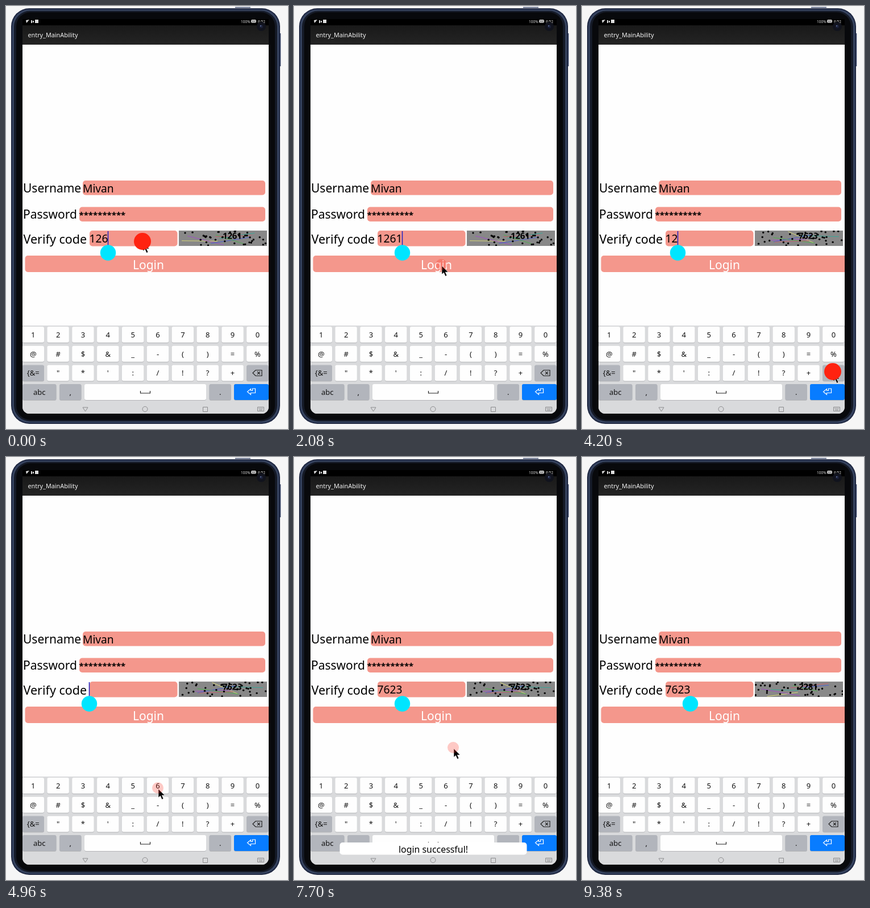
Write an HTML page that moves like this. It is 496x744 px and loops after 9.5 s.

```html
<!DOCTYPE html>
<html lang="en">
<head>
<meta charset="utf-8">
<title>Login form on a tablet</title>
<style>
  html, body { margin: 0; width: 100%; height: 100%; overflow: hidden; background: #f6f6f6; }
  svg { display: block; width: 496px; height: 744px; font-family: "Noto Sans", sans-serif; }
  .label { font-size: 21px; }
  .value { font-size: 19.2px; }
  .field { fill: #f4978c; }
  .icon { fill: none; stroke: #222; stroke-width: 1.2; }
  .nav { fill: none; stroke: #8b8b8d; }
  .key { font-size: 13px; font-weight: 500; text-anchor: middle; fill: #111; }
</style>
</head>
<body>
<svg viewBox="0 0 496 744">
  <defs>
    <clipPath id="screen"><path d="M29 23H462V705a12 12 0 0 1-12 12H41a12 12 0 0 1-12-12z"/></clipPath>
    <clipPath id="captchaBox"><path d="M304 395h155v27H304z"/></clipPath>
    <linearGradient id="bar" x2="0" y2="1"><stop stop-color="#191919"/><stop offset="1" stop-color="#242424"/></linearGradient>
  </defs>

  <path d="M403 2.5h27M482.500 48v58" stroke="#3d4a6c" stroke-width="1.500"/>
  <rect x="9" y="4" width="473" height="731" rx="32" fill="#1d2640"/>
  <rect x="11" y="6" width="469" height="727" rx="30" fill="#36435f"/>
  <rect x="14" y="8.500" width="463" height="722" rx="28" fill="#151a27"/>
  <rect x="18" y="11" width="455" height="717" rx="25" fill="#08090c"/>

  <g clip-path="url(#screen)">
    <path d="M29 23h433v694H29z" fill="#fefefe"/>
    <path d="M29 23h433v11H29z"/>
    <path d="M29 34h433v34H29z" fill="url(#bar)"/>
    <g fill="#ddd" font-size="6.500">
      <path d="M35 25l6-1-5 6zM44 25h2v5h-2zM47 26h2v3h-2zM51 24h6v6h-6z"/>
      <text x="413" y="29.500">100%</text>
      <rect x="431.500" y="24.500" width="8" height="4.500" rx="1" fill="#999" stroke="#ddd"/>
      <text x="443" y="29.500">6:52</text>
    </g>
    <text x="38.500" y="55" font-size="10.800" fill="#f2f2f2">entry_MainAbility</text>

    <g class="field">
      <rect x="135" y="307" width="321" height="25.500" rx="5"/>
      <rect x="129" y="353.500" width="327" height="25.500" rx="5"/>
      <rect x="147" y="395" width="154.500" height="27.500" rx="5"/>
      <rect x="33.500" y="439" width="440" height="29" rx="5"/>
    </g>
    <g class="label">
      <text x="30" y="328">Username</text>
      <text x="30" y="374">Password</text>
      <text x="30.500" y="418" font-size="21.500">Verify code</text>
      <text x="250.500" y="462.500" fill="#fff" text-anchor="middle">Login</text>
    </g>
    <text class="value" x="135" y="327.500">Mivan</text>
    <text x="128.500" y="372.500" font-size="15" font-weight="600">**********</text>
    <text class="value" id="code" x="146.500" y="416"></text>
    <g clip-path="url(#captchaBox)" id="captcha"></g>
    <path id="caret" d="M0 396v25" stroke="#1c22c4" stroke-width="1.500"/>
    <circle id="handle" cy="434" r="13.700" fill="#00e5ff"/>

    <path d="M29 562h433v155H29z" fill="#d9dadc"/>
    <g id="keys"></g>
    <path class="icon" d="M434 645.500l5-5h11v10h-11zM442 643l5 5M447 643l-5 5"/>
    <path class="icon" d="M236.500 677v4h17v-4"/>
    <path d="M438.500 673h-5v3.500h-3v-3l-6 5 6 5v-3h8z" fill="none" stroke="#fff" stroke-width="1.200"/>
    <g class="nav">
      <path d="M135 706h9l-4.500 7z"/>
      <circle cx="244.500" cy="709" r="4.500"/>
      <path d="M346.500 705.500h8v8h-8z"/>
      <path d="M442.500 705.500h11v7h-11zM444 708h8M445 710.500h6"/>
    </g>
    <g id="toast">
      <rect x="80.500" y="678" width="329" height="21.500" rx="5" fill="#fff"/>
      <text x="245" y="696" font-size="15.900" text-anchor="middle">login successful!</text>
    </g>
  </g>
  <circle cx="449" cy="36" r="8" fill="#11131d"/>
  <circle cx="449" cy="36" r="3" fill="#1b2138"/>
  <circle cx="448" cy="35" r="1" fill="#6a78a8"/>

  <g id="pointer">
    <path d="M0 0V15l3.500-3 2.700 6.300 2.700-1.200-2.700-6h5z" stroke="#fff" stroke-width=".6"/>
    <circle id="spot" cx="-1" cy="-2" fill="#ff2310"/>
  </g>
</svg>

<script>
const LOOP = 9500;
const $ = id => document.getElementById(id);

function key(x, y, width, label, fill = '#fefefe') {
  return `<rect x="${x}" y="${y + 1}" width="${width}" height="28" rx="3" fill="#b4b5b8"/>
    <rect x="${x}" y="${y}" width="${width}" height="28" rx="3" fill="${fill}"/>
    <text class="key" x="${x + width / 2}" y="${y + 19}">${label}</text>`;
}

function keyboard() {
  const grey = '#b2b5bc';
  const rows = [
    [...'1234567890'],
    ['@', '#', '$', '&amp;', '_', '-', '(', ')', '=', '%'],
    ['{&amp;=', '"', '*', "'", ':', '/', '!', '?', '+', '']
  ];
  const grid = rows.map((row, r) => row.map((label, c) =>
    key(28.5 + c * 43.85, 564 + r * 33.7, 38.5, label, r === 2 && c % 9 === 0 ? grey : undefined)));
  return grid.flat().join('') +
    key(29, 665, 59.5, 'abc', grey) + key(94, 665, 38.5, ',', grey) + key(138, 665, 214, '') +
    key(357.5, 665, 38.5, '.', grey) + key(401, 665, 61, '', '#087cff');
}

function captcha(digits, seed) {
  const random = () => (seed = seed * 16807 % 2147483647) / 2147483647;
  const px = () => 304 + random() * 155, py = () => 396 + random() * 25;
  const colors = ['#d8d878', '#38a898', '#a050c8', '#5060d0', '#50b050', '#c06070'];
  let art = '<path d="M304 395h155v27H304z" fill="#888"/>';
  for (const color of colors) {
    const x = 306 + random() * 80;
    art += `<path d="M${x} ${py()}L${x + 40 + random() * 35} ${py()}" stroke="${color}"/>`;
  }
  for (let i = 0; i < 38; i++) art += `<circle cx="${px()}" cy="${py()}" r="1.700"/>`;
  [...digits].forEach((digit, i) => {
    const x = 381 + i * 8.4;
    art += `<text x="${x}" y="409.500" font-size="15" font-weight="700"
      transform="rotate(${random() * 20 - 4} ${x + 4} 405)">${digit}</text>`;
  });
  return art;
}

// Pointer stops: time, x, y
const path = [
  [0, 241, 416], [250, 241, 416], [900, 50, 579], [1300, 50, 579],
  [1980, 260, 457], [2450, 260, 457], [2950, 315, 403], [3450, 315, 403],
  [3900, 442, 645], [4640, 442, 645], [4960, 268, 584], [5180, 312, 582],
  [5350, 312, 582], [5580, 268, 582], [5780, 268, 582], [6100, 92, 580],
  [6280, 92, 580], [6520, 127, 577], [6860, 130, 577], [7150, 255, 456],
  [7480, 255, 456], [7700, 281, 513], [8250, 512, 545], [LOOP, 512, 545]
];
const clicks = [50, 1100, 2340, 3040, 4000, 4180, 4360, 4540, 5250, 5660, 6180, 6680, 7380];
const typed = [
  [0, '126'], [1100, '1261'], [4000, '126'], [4180, '12'], [4360, '1'], [4540, ''],
  [5250, '7'], [5660, '76'], [6180, '762'], [6680, '7623']
];
const captchas = [[0, '1261', 4711], [3060, '7623', 90210], [8300, '2281', 31337]];

const latest = (list, t) => list.findLast(entry => entry[0] <= t);
const clamp = v => Math.max(0, Math.min(1, v));

function pointerAt(t) {
  const i = path.findIndex(stop => stop[0] > t);
  const [t0, x0, y0] = path[i - 1], [t1, x1, y1] = path[i];
  const u = (t - t0) / (t1 - t0), k = u * u * (3 - 2 * u);
  return [x0 + (x1 - x0) * k, y0 + (y1 - y0) * k];
}

let shown;
function draw(t) {
  const image = latest(captchas, t);
  if (image !== shown) {
    shown = image;
    $('captcha').innerHTML = captcha(image[1], image[2]);
  }
  const code = latest(typed, t)[1];
  const end = 146.5 + code.length * 11;
  $('code').textContent = code;
  $('caret').setAttribute('transform', `translate(${end})`);
  $('caret').style.opacity = (t + 140) % 1000 < 500 ? 1 : 0;
  $('handle').setAttribute('cx', end);

  $('pointer').setAttribute('transform', `translate(${pointerAt(t)})`);
  const pressed = clicks.some(click => Math.abs(t - click) < 70);
  $('spot').setAttribute('r', pressed ? 15 : 10);
  $('spot').style.opacity = pressed ? 1 : 0.24;

  $('toast').style.opacity = clamp((t - 7560) / 80) * clamp((9200 - t) / 80);
}

$('keys').innerHTML = keyboard();
function tick() {
  draw(performance.now() % LOOP);
  requestAnimationFrame(tick);
}
tick();
</script>
</body>
</html>
```
